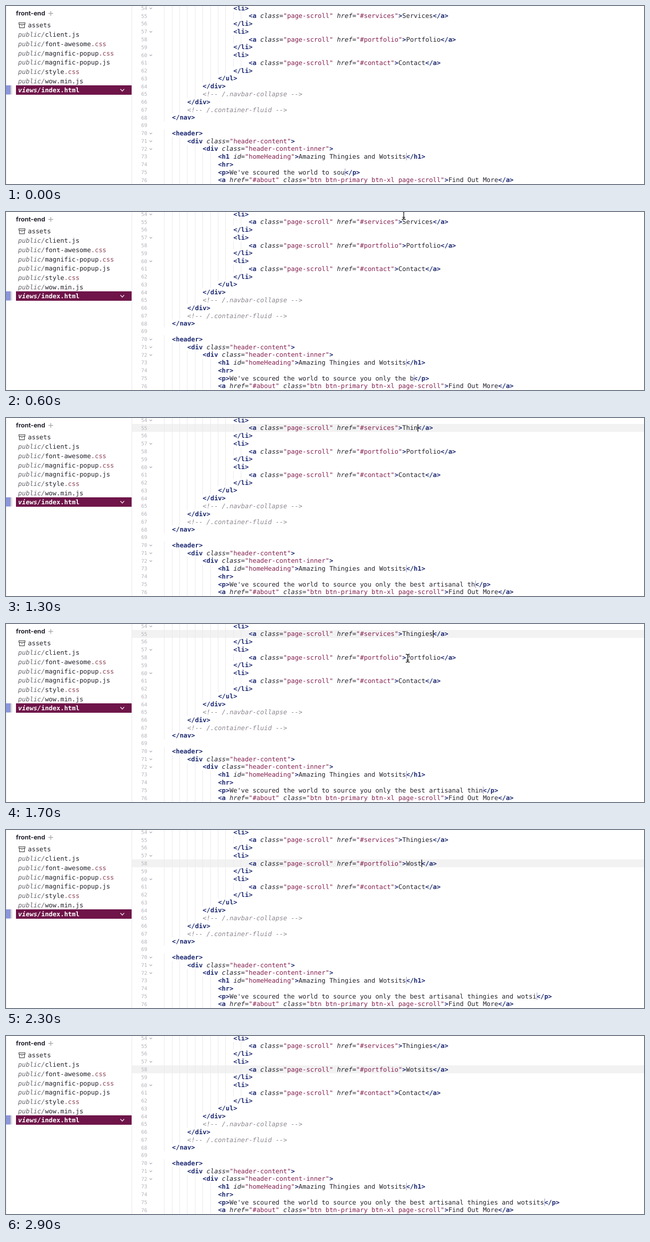
An HTML page that plays this animation: 1280x359 px, repeating every 3 s.

```html
<!DOCTYPE html>
<html lang="en">
<head>
<meta charset="utf-8">
<title>Shared code editor</title>
<style>
html, body { margin: 0; width: 100%; height: 100%; overflow: hidden; background: #fff; }
svg { display: block; width: 1280px; height: 359px; }
text { font: 12.79px "DejaVu Sans Mono", "Liberation Mono", monospace; fill: #24222c;
  white-space: pre; text-rendering: geometricPrecision; }
.tag { font-weight: bold; fill: #1d2a72; }
.attr { font-style: italic; }
.str { fill: #83204f; }
.note { font-style: italic; fill: #8d8790; }
.num { font-size: 10.2px; fill: #b6b2bd; text-anchor: end; }
.title { font: bold 12.5px Inter, Roboto, sans-serif; }
.dir { font-style: italic; fill: #66636a; }
.css { fill: #8a4456; }
.open { font-weight: bold; fill: #fff; }
.open .dir { fill: #fff; }
.guide { stroke: #e9e9ec; }
.fold { fill: none; stroke: #aaa6b0; stroke-width: 1.1; }
.caret { stroke: #111; stroke-width: 1.4; }
.remote { stroke: #a9a9cf; stroke-width: 1.4; }
</style>
</head>
<body>
<svg viewBox="0 0 1280 359">
  <g id="side"></g>
  <g id="back"></g>
  <g id="code"></g>
  <g id="live"></g>
  <g id="mouse" fill="none" stroke-linecap="round">
    <path id="beam" stroke="#fff" stroke-width="3.2" d="M-3.5-8Q0-8 0-5.5Q0-8 3.5-8M0-5.5V5.5M-3.5 8Q0 8 0 5.5Q0 8 3.5 8M-2.2 3.8H2.2"/>
    <use href="#beam"/>
    <path stroke="#222" stroke-width="1.4" d="M-3.5-8Q0-8 0-5.5Q0-8 3.5-8M0-5.5V5.5M-3.5 8Q0 8 0 5.5Q0 8 3.5 8M-2.2 3.8H2.2"/>
  </g>
</svg>
<script>
const $ = id => document.getElementById(id);
const CHAR = 7.7, LEFT = 302.2, PITCH = 15.76, FIRST = 54;
const colX = c => LEFT + c * CHAR;
const rowY = n => 20 + (n - 55) * PITCH;
const esc = s => s.replace(/&/g, '&amp;').replace(/</g, '&lt;').replace(/>/g, '&gt;');
const label = (x, y, s, cls = '') => `<text x="${x}" y="${y}" class="${cls}">${esc(s)}</text>`;
const line = (x, y1, y2, cls) => `<path class="${cls}" d="M${x} ${y1}V${y2}"/>`;
const rect = (x, y, w, h, fill) => `<rect x="${x}" y="${y}" width="${w}" height="${h}" fill="${fill}"/>`;

const link = (id, s) => `<a class="page-scroll" href="#${id}">${s}</a>`;
const slogan = "We've scoured the world to source you only the best artisanal thingies and wotsits";

// [indent, markup] for each row; null rows are filled in over time
const rows = [
  [20, '<li>'], [24, null], [20, '</li>'],
  [20, '<li>'], [24, null], [20, '</li>'],
  [20, '<li>'], [24, link('contact', 'Contact')], [20, '</li>'],
  [16, '</ul>'], [12, '</div>'], [12, '<!-- /.navbar-collapse -->'],
  [8, '</div>'], [8, '<!-- /.container-fluid -->'], [4, '</nav>'], [0, ''],
  [4, '<header>'], [8, '<div class="header-content">'],
  [12, '<div class="header-content-inner">'],
  [16, '<h1 id="homeHeading">Amazing Thingies and Wotsits</h1>'],
  [16, '<hr>'], [16, null],
  [16, '<a href="#about" class="btn btn-primary btn-xl page-scroll">Find Out More</a>']
];
const folds = [54, 57, 60, 70, 71, 72];
const TOKEN = /<!--.*?-->|<\/?\w+|>|\s+|[\w-]+(?==")|=|"[^"]*"|[^<>="]+/g;

function kind(token, next) {
  if (token.startsWith('<!--')) return 'note';
  if (/^[<>]/.test(token)) return 'tag';
  if (token[0] === '"') return 'str';
  return next === '=' ? 'attr' : '';
}

function markup(n, indent, src) {
  const parts = src.match(TOKEN) || [];
  let col = indent;
  return parts.map((p, i) => {
    const out = p.trim() ? label(colX(col), rowY(n) + 4.4, p, kind(p, parts[i + 1])) : '';
    col += p.length;
    return out;
  }).join('');
}

function drawCode() {
  let out = '';
  rows.forEach(([indent, src], i) => {
    const n = FIRST + i, y = rowY(n);
    for (let c = 2; c < indent; c += 2)
      out += line(Math.floor(colX(c)) + .5, y - PITCH / 2, y + PITCH / 2, 'guide');
    out += label(283.5, y + 3.7, String(n), 'num');
    if (folds.includes(n)) out += `<path class="fold" d="M288 ${y - .8}l2.5 2.5l2.5-2.5"/>`;
    if (src) out += markup(n, indent, src);
  });
  $('code').innerHTML = out + line(803.5, rowY(73) - 7.5, rowY(73) + 7.5, 'remote');
}

function drawSide() {
  const files = ['client.js', 'font-awesome.css', 'magnific-popup.css', 'magnific-popup.js',
    'style.css', 'wow.min.js', 'index.html'];
  let out = line(.5, 0, 359, 'guide') + line(252.5, 0, 359, 'guide');
  out += label(20, 19, 'front-end', 'title') + label(44, 43.2, 'assets');
  out += '<path d="M85 15h9.5M89.75 10.2v9.6" stroke="#aaa" stroke-width="1.5"/>';
  out += '<path d="M26 33.5h12v3.3h-12zM27 36.8v7h10v-7M30.5 39.5h3" fill="none" stroke="#444" stroke-width="1.2"/>';
  out += rect(20, 160, 232, 19, '#6f1549') + rect(0, 160, 9, 18.5, '#8b95dc');
  out += '<path d="M9.5 160v18.5M11.5 161v17.5" stroke="#777" stroke-dasharray="1 1"/>';
  out += '<path d="M229.5 167.5l3.8 4l3.8-4" fill="none" stroke="#e6d5df" stroke-width="1.6"/>';
  files.forEach((f, i) => {
    const open = f === 'index.html';
    const [, base, ext] = f.match(/^(.*?)(\.css)?$/);
    out += `<text x="24.3" y="${62.2 + i * 18.67}" class="${open ? 'open' : ''}">` +
      `<tspan class="dir">${open ? 'views/' : 'public/'}</tspan>${base}<tspan class="css">${ext || ''}</tspan></text>`;
  });
  $('side').innerHTML = out;
}

// Linear interpolation through [time, value, ...] keys; null outside them
function along(keys, t, k = 1) {
  if (t < keys[0][0] || t > keys[keys.length - 1][0]) return null;
  let i = 1;
  while (i < keys.length - 1 && t > keys[i][0]) i++;
  const a = keys[i - 1], b = keys[i];
  return a[k] + (b[k] - a[k]) * (t - a[0]) / (b[0] - a[0]);
}

const typed = [[0, 30], [600, 48], [900, 56], [1200, 64], [1500, 65], [1700, 66], [1800, 68],
  [2100, 76], [2300, 80], [2400, 81], [2500, 82], [3000, 82]];
const strolls = [
  [[500, 799, -4], [600, 798, 7], [700, 797, 17], [800, 804, 19], [900, 842, 18], [1000, 862, 18], [1100, 862, 18]],
  [[1600, 824, 44], [1700, 806, 69], [1800, 803, 69], [2000, 854, 69], [2100, 873, 69]]
];

// Word, selected length and caret column for each link
function servicesAt(t) {
  if (t < 800) return ['Services', 0, null];
  if (t < 1200) return ['Services', t < 900 ? 1 : t < 1000 ? 5 : 8];
  return ['Thingies'.slice(0, Math.min(8, (t - 1100) / 50)), 0];
}
function portfolioAt(t) {
  if (t < 1900) return ['Portfolio', 0, null];
  if (t < 2200) return ['Portfolio', Math.min(9, Math.round((t - 1800) / 100 * 3))];
  if (t < 2500) return ['Wosti'.slice(0, Math.min(5, (t - 2100) / 50)), 0];
  if (t < 2600) return ['Wo', 0];
  return ['Wotsits'.slice(0, Math.min(7, 3 + (t - 2600) / 50)), 0];
}

function render(t) {
  let back = '', live = '';
  const active = t < 800 ? 0 : t < 1900 ? 55 : 58;
  if (active) back += rect(253, rowY(active) - 8, 1027, 16, '#f2f2f2');

  [[55, 'services', servicesAt(t)], [58, 'portfolio', portfolioAt(t)]].forEach(([n, id, [word, sel]]) => {
    const start = 24 + link(id, '').length - 4, y = rowY(n);
    if (sel) back += rect(colX(start), y - 8, sel * CHAR, 16, '#d8d7e2');
    live += markup(n, 24, link(id, word));
    if (n === active && t < 2900)
      live += line(colX(start + (sel || word.length)) + .6, y - 7.5, y + 7.5, 'caret');
  });

  const count = Math.round(along(typed, t));
  live += markup(75, 16, `<p>${slogan.slice(0, count)}</p>`);
  live += line(colX(19 + count) + .8, rowY(75) - 7.5, rowY(75) + 7.5, 'remote');
  $('back').innerHTML = back;
  $('live').innerHTML = live;

  const path = strolls.find(s => along(s, t) !== null);
  $('mouse').style.display = path ? '' : 'none';
  if (path) $('mouse').setAttribute('transform', `translate(${along(path, t)} ${along(path, t, 2)})`);
}

const LOOP = 3000, STEP = 100;
let last = -1;
function tick() {
  const t = Math.floor(performance.now() % LOOP / STEP) * STEP;
  if (t !== last) render(last = t);
  requestAnimationFrame(tick);
}
drawSide();
drawCode();
tick();
</script>
</body>
</html>
```
